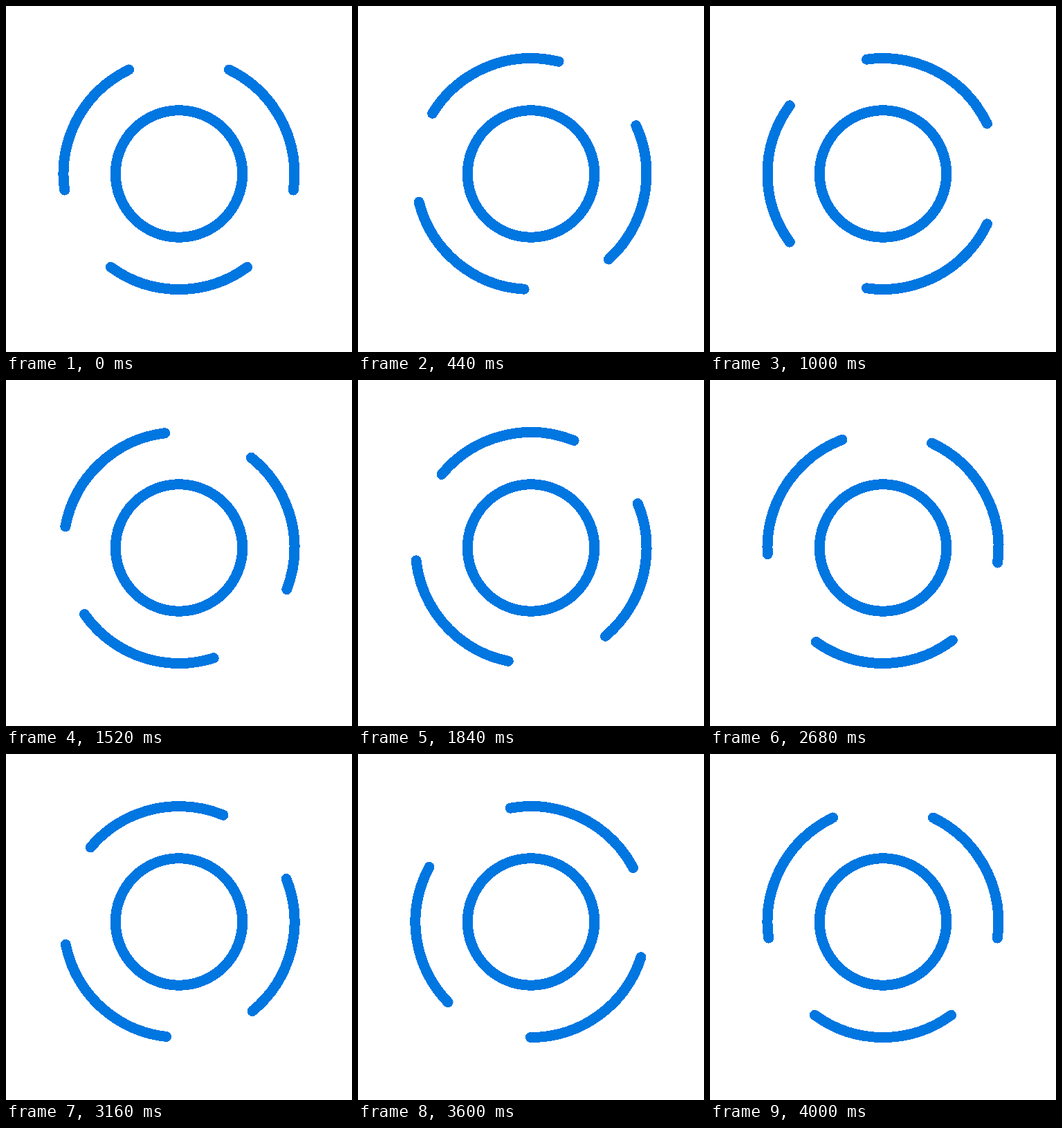
Animation of 500x500 px, one loop 4040 ms. Source, as an HTML page:

```html
<!DOCTYPE html>
<html lang="en">
<head>
<meta charset="utf-8">
<title>Spinner</title>
<style>
  html, body { margin: 0; width: 100%; height: 100%; overflow: hidden; background: #fff; }
  svg { display: block; width: 100%; height: 100%; }
  circle { fill: none; stroke: #0076e1; stroke-width: 15; shape-rendering: crispEdges; }
  #arcs { stroke-linecap: round; stroke-dasharray: 72.4 45.7 72.4 51.4 72.4 45.7; }
</style>
</head>
<body>
<svg viewBox="0 0 500 500">
  <g transform="translate(250 242.5)">
    <circle r="91.75"/>
    <circle id="arcs" r="167" pathLength="360" transform="rotate(53.8)"/>
  </g>
</svg>
<script>
  const STEP_MS = 40, STEPS = 101, STEP_DEG = 3.6, START_DEG = 53.8;
  const arcs = document.getElementById('arcs');

  // One turn takes 100 steps; the last step of the loop rests on the first pose.
  function draw() {
    const step = Math.floor(performance.now() / STEP_MS + 0.1) % STEPS;
    arcs.setAttribute('transform', `rotate(${START_DEG + step * STEP_DEG})`);
    requestAnimationFrame(draw);
  }
  draw();
</script>
</body>
</html>
```
